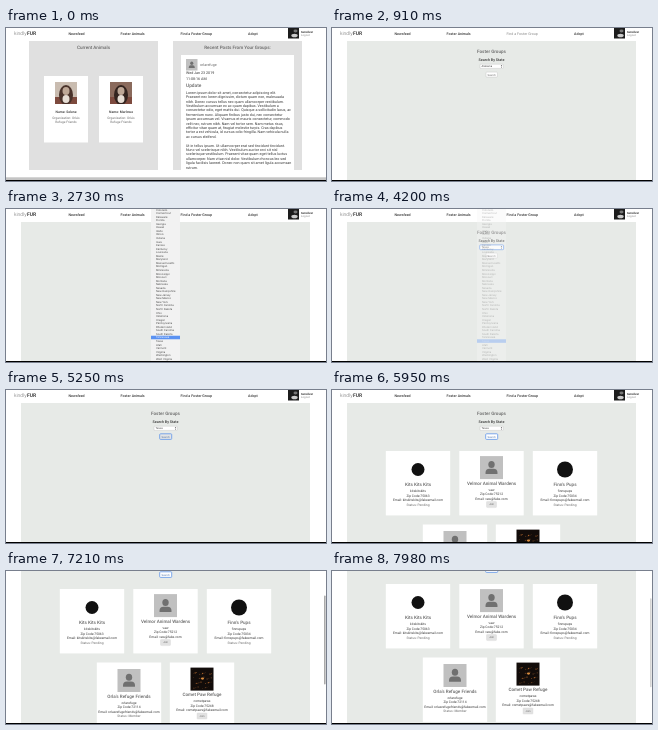
Animation of 320x153 px, one loop 8000 ms. Source, as an HTML page with a canvas:

```html
<!DOCTYPE html>
<html lang="en">
<head>
<meta charset="utf-8">
<title>Foster groups</title>
<style>
html, body { margin: 0; width: 320px; height: 153px; overflow: hidden; background: #fff; }
canvas { display: block; }
</style>
</head>
<body>
<canvas id="stage" width="320" height="153"></canvas>
<script>
const ctx = document.getElementById('stage').getContext('2d');
const LOOP = 8000;
const DARK = '#333', GREY = '#666', PALE = '#888', PAGE = '#e7eae7', BLUE = '#5b92f2';
const ROW = 3.55;

const STATES = ('Alabama,Alaska,Arizona,Arkansas,California,Colorado,Connecticut,Delaware,Florida,Georgia,' +
  'Hawaii,Idaho,Illinois,Indiana,Iowa,Kansas,Kentucky,Louisiana,Maine,Maryland,Massachusetts,Michigan,' +
  'Minnesota,Mississippi,Missouri,Montana,Nebraska,Nevada,New Hampshire,New Jersey,New Mexico,New York,' +
  'North Carolina,North Dakota,Ohio,Oklahoma,Oregon,Pennsylvania,Rhode Island,South Carolina,South Dakota,' +
  'Tennessee,Texas,Utah,Vermont,Virginia,Washington,West Virginia,Wisconsin,Wyoming').split(',');

const POST = `Lorem ipsum dolor sit amet, consectetur adipiscing elit.
Praesent nec lorem dignissim, dictum quam non, malesuada
nibh. Donec cursus tellus nec quam ullamcorper vestibulum.
Vestibulum accumsan ex ac quam dapibus. Vestibulum a
consectetur odio, eget mattis dui. Quisque a sollicitudin lacus, ac
fermentum nunc. Aliquam finibus justo dui, nec consectetur
ipsum accumsan vel. Vivamus et mauris consectetur, commodo
velit nec, rutrum nibh. Nam vel tortor sem. Nam metus risus,
efficitur vitae quam at, feugiat molestie turpis. Cras dapibus
tortor a est vehicula, id cursus odio fringilla. Nam vehicula nulla
ac cursus eleifend.

Ut in tellus ipsum. Ut ullamcorper erat sed tincidunt tincidunt.
Nunc vel scelerisque nibh. Vestibulum auctor orci sit nisl
scelerisque vestibulum. Praesent vitae quam eget tellus luctus
ullamcorper. Nam vitae nisl dolor. Vestibulum rhoncus leo sed
ligula facilisis laoreet. Donec non quam sit amet ligula accumsan
rutrum.`.split('\n');

const GROUPS = [
  { x: 86, y: 61, name: 'Kits Kits Kits', user: 'kitskitskits', zip: 75063, mail: 'kitskitskits@fakeemail.com', status: 'Pending', art: badge(6.5), shown: 5530 },
  { x: 159.5, y: 61, name: 'Velmor Animal Wardens', user: 'vaw', zip: 75212, mail: 'vaw@fake.com', art: person, shown: 5530 },
  { x: 233, y: 61, name: "Finn's Pups", user: 'finnspups', zip: 75034, mail: 'finnspups@fakeemail.com', status: 'Pending', art: badge(8), shown: 5530 },
  { x: 123, y: 134.5, name: "Orla's Refuge Friends", user: 'orlarefuge', zip: 72114, mail: 'orlasrefugefriends@fakeemail.com', status: 'Member', art: person, shown: 5740 },
  { x: 196, y: 134.5, name: 'Comet Paw Refuge', user: 'cometpaws', zip: 75248, mail: 'cometpaws@fakeemail.com', art: nebula, shown: 5390 }
];

// Value of the last [time, value] step reached.
const at = (t, steps) => steps.reduce((value, [start, next]) => t >= start ? next : value, steps[0][1]);

function rect(x, y, w, h, color) {
  ctx.fillStyle = color;
  ctx.fillRect(x, y, w, h);
}

function blob(x, y, rx, ry, color) {
  ctx.fillStyle = color;
  ctx.beginPath();
  ctx.ellipse(x, y, rx, ry, 0, 0, 7);
  ctx.fill();
}

function box(x, y, w, h, fill, border, line = 0.4) {
  ctx.beginPath();
  ctx.roundRect(x, y, w, h, 0.8);
  ctx.fillStyle = fill;
  ctx.fill();
  ctx.strokeStyle = border;
  ctx.lineWidth = line;
  ctx.stroke();
}

function control(x, y, w, h, fill, focused) {
  if (focused) box(x - 0.3, y - 0.3, w + 0.6, h + 0.6, fill, '#6f9fea', 0.9);
  else box(x, y, w, h, fill, '#bbb');
}

function text(str, x, y, size = 3.66, color = DARK, weight = 400, align = 'left', family = 'Roboto') {
  ctx.font = `${weight} ${size}px ${family}, sans-serif`;
  ctx.textRendering = 'geometricPrecision';
  ctx.textAlign = align;
  ctx.fillStyle = color;
  ctx.fillText(str, x, y + size * 0.35);
}

const centered = (str, x, y, size, color, weight) => text(str, x, y, size, color, weight, 'center');

function clipped(x, y, w, h, draw) {
  ctx.save();
  ctx.beginPath();
  ctx.rect(x, y, w, h);
  ctx.clip();
  draw();
  ctx.restore();
}

function badge(radius) {
  return (x, y) => blob(x + 11.5, y + 12, radius, radius, '#111');
}

function person(x, y, size = 23) {
  const u = size / 23;
  rect(x, y, size, size, '#c0c0c0');
  blob(x + 11.5 * u, y + 8.3 * u, 3.2 * u, 3.5 * u, '#707070');
  ctx.beginPath();
  ctx.roundRect(x + 5.5 * u, y + 12.6 * u, 12 * u, 5.2 * u, [4 * u, 4 * u, 0.5 * u, 0.5 * u]);
  ctx.fill();
}

function nebula(x, y) {
  rect(x, y, 23, 23, '#120c0a');
  for (let i = 0; i < 40; i++) {
    const r = 0.25 + i % 3 * 0.2;
    blob(x + 2 + i * 7.3 % 19, y + 2 + i * 4.7 % 19, r, r, i % 2 ? '#a8622c' : '#5f3a20');
  }
  blob(x + 12, y + 11, 1.6, 1.1, '#d98d3e');
}

function petPhoto(x, y, wall, coat) {
  clipped(x, y, 22, 22, () => {
    rect(x, y, 22, 22, wall);
    rect(x, y + 15, 22, 7, '#7d4a3e');
    blob(x + 11, y + 13, 7, 10, coat);
    blob(x + 11, y + 9, 3.5, 4, '#bda796');
    blob(x + 11, y + 17, 3.5, 4, '#e6ddd4');
  });
}

function header(t) {
  text('kindly', 8, 5.7, 5, GREY, 300);
  text('FUR', 20.9, 5.7, 5, '#444', 700);
  const hovered = t >= 350 && t < 1400;
  text('Newsfeed', 62.5, 5.5, 3.6, DARK, 500);
  text('Foster Animals', 114.5, 5.5, 3.6, DARK, 500);
  text('Find a Foster Group', 174.5, 5.5, 3.6, hovered ? '#888' : DARK, hovered ? 400 : 500);
  text('Adopt', 242, 5.5, 3.6, DARK, 500);
  rect(282, 0, 11, 10.5, '#1c1c1c');
  blob(288.5, 7.5, 3.2, 1.8, '#ccc');
  blob(289.5, 3, 2, 1.4, '#777');
  text('tamsilver', 295, 4, 2.9, DARK, 700);
  text('Logout', 295, 7.3, 2.8, PALE);
}

function petCard(x, name, wall, coat) {
  rect(x - 22, 48, 44, 66.5, '#fff');
  petPhoto(x - 11, 54, wall, coat);
  centered('Name: ' + name, x, 83.5, 3.4, DARK, 500);
  centered("Organization: Orla's", x, 90.3, 3.2, GREY);
  centered('Refuge Friends', x, 94.3, 3.2, GREY);
}

function newsfeed() {
  rect(23, 13, 129, 129, '#e0e0e0');
  rect(167, 13, 129, 129, '#e0e0e0');
  centered('Current Animals', 87.5, 19, 4.58, GREY, 500);
  petCard(60, 'Selene', '#c9bcb0', '#4a332b');
  petCard(115, 'Marlowe', '#8a6a5c', '#33241f');
  centered('Recent Posts From Your Groups:', 231.5, 19, 4.58, GREY, 500);
  rect(175, 27, 113, 115, '#fff');
  person(180, 31, 11.5);
  text('orlarefuge', 194, 36.7, 3.66, GREY);
  text('Wed Jan 23 2019', 180, 45);
  text('11:08:16 AM', 180, 50.7);
  text('Update', 180, 57.5, 4.8, GREY, 500);
  POST.forEach((line, i) => text(line, 180, 64.5 + i * 4.4));
  rect(0, 142, 320, 7.3, '#fff');
  rect(0, 149.3, 320, 2.7, '#c4c4c4');
}

function searchForm(t) {
  centered('Foster Groups', 159.5, 23.5, 4.58, GREY, 500);
  centered('Search By State', 159.5, 32, 3.66, DARK, 500);

  control(148, 36.2, 23.3, 4.2, '#fff', t >= 1890 && t < 5180);
  text(t < 4200 ? 'Alabama' : 'Texas', 149.6, 38.3, 2.6, DARK, 400, 'left', 'Inter');
  ctx.fillStyle = '#444';
  ctx.beginPath();
  for (const d of [-1, 1]) {
    ctx.moveTo(168.8, 38.3 + d * 0.4);
    ctx.lineTo(170.2, 38.3 + d * 0.4);
    ctx.lineTo(169.5, 38.3 + d * 1.4);
  }
  ctx.fill();

  const focused = t >= 5180;
  const fill = at(t, [[0, '#fff'], [4760, '#f5f5f5'], [4830, '#ececec'], [4900, '#e4e4e4'], [5950, '#fff']]);
  control(154, 44.1, 11.4, 5, fill, focused);
  centered('Search', 159.7, 46.6, 2.7, focused ? '#4a6fa8' : GREY);
}

function groupCard(group, t) {
  const { x, y } = group;
  const top = y + (group.status ? 1 : -0.4);
  rect(x - 32.2, y, 64.4, 64.4, '#fff');
  if (t >= group.shown) group.art(x - 11.5, top + 5.5);
  centered(group.name, x, top + 32.6, 4.58, GREY, 500);
  centered(group.user, x, top + 39, 3.3);
  centered('Zip Code:' + group.zip, x, top + 43.4, 3.3);
  centered('Email: ' + group.mail, x, top + 47.9, 3.3);
  if (group.status) {
    centered('Status: ' + group.status, x, top + 52.4, 3.3, GREY);
  } else {
    box(x - 5, top + 50.8, 10, 6.2, '#e2e2e2', '#d0d0d0', 0.3);
    centered('Join', x, top + 53.9, 2.7, GREY);
  }
}

function dropdown(t) {
  ctx.globalAlpha = at(t, [[0, 1], [4200, 0.35], [4270, 0.15]]);
  const first = at(t, [[0, 38], [2660, 8], [2730, -17.05]]);
  const top = at(t, [[0, 36], [2660, 4], [2730, 0]]);
  const active = at(t, [[0, 0], [2240, 6], [2310, 14], [2380, 21], [2450, 26], [2660, 34],
    [2730, 41], [3080, 40], [3360, 41], [3570, 42], [3990, -1], [4060, 42]]);
  clipped(145, top, 29, 152 - top, () => {
    rect(145, top, 29, 152, '#f2f2f2');
    STATES.forEach((name, i) => {
      const y = first + i * ROW;
      if (i === active) rect(145, y - ROW / 2, 29, ROW, BLUE);
      text(name, 150, y, 2.6, i === active ? '#fff' : '#444', 400, 'left', 'Inter');
    });
  });
  ctx.globalAlpha = 1;
}

function scrollbar(scroll, t) {
  ctx.globalAlpha = at(t, [[0, 1], [7910, 0.75], [7980, 0.5]]);
  ctx.fillStyle = '#aaa';
  ctx.beginPath();
  ctx.roundRect(318, scroll * 0.57, 1.6, 89, 0.8);
  ctx.fill();
  ctx.globalAlpha = 1;
}

function render(t) {
  const scroll = at(t, [[0, 0], [6580, 5], [6720, 16], [6860, 26.3], [7000, 36], [7210, 43], [7280, 46.5], [7350, 48]]);
  rect(0, 0, 320, 153, '#fff');
  ctx.save();
  ctx.translate(0, -scroll);
  header(t);
  if (t < 910) {
    newsfeed();
  } else {
    rect(15, 13, 289, 260, PAGE);
    searchForm(t);
    if (t >= 5390) GROUPS.forEach(group => groupCard(group, t));
  }
  ctx.restore();
  if (t >= 1890 && t < 4340) dropdown(t);
  if (t >= 6580) scrollbar(scroll, t);
  rect(0, 152, 320, 1, '#000');
}

function tick() {
  render(performance.now() % LOOP);
  requestAnimationFrame(tick);
}
tick();
</script>
</body>
</html>
```
